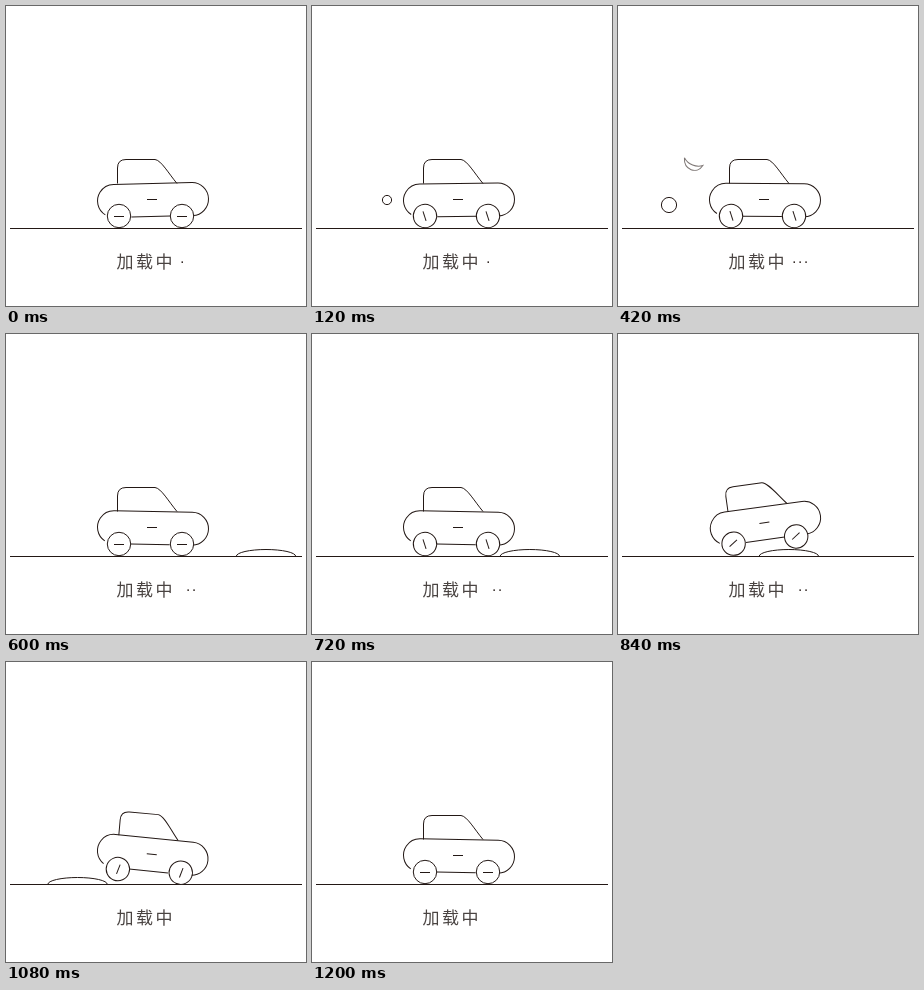
Recreate the animation shown at these times as an HTML page with a canvas. Size 300 by 300 pixels, loop 1.23 s.

```html
<!DOCTYPE html>
<html lang="zh">
<head>
<meta charset="utf-8">
<style>
  html, body { margin: 0; width: 100%; height: 100%; overflow: hidden; background: #fff; }
  canvas { display: block; width: 300px; height: 300px; }
</style>
</head>
<body>
<canvas id="stage"></canvas>
<script>
const LOOP = 1230, STEP = 30, INK = '#231815';
const canvas = document.getElementById('stage');
const ctx = canvas.getContext('2d');
const ratio = window.devicePixelRatio || 1;
canvas.width = canvas.height = 300 * ratio;

const radians = degrees => degrees * Math.PI / 180;
const within = (t, from, to) => t >= from && t < to;
const progress = (t, from, to) => Math.min(1, Math.max(0, (t - from) / (to - from)));

function stroke(build) {
  ctx.beginPath();
  build();
  ctx.stroke();
}

function line(x1, y1, x2, y2) {
  stroke(() => { ctx.moveTo(x1, y1); ctx.lineTo(x2, y2); });
}

function circle(x, y, r) {
  stroke(() => ctx.arc(x, y, r, 0, 2 * Math.PI));
}

function rotated(x, y, degrees, draw) {
  ctx.save();
  ctx.translate(x, y);
  ctx.rotate(radians(degrees));
  draw();
  ctx.restore();
}

function drawWheel(x, y, degrees) {
  rotated(x, y, degrees, () => {
    ctx.fillStyle = '#fff';
    ctx.beginPath();
    ctx.arc(0, 0, 11.7, 0, 2 * Math.PI);
    ctx.fill();
    ctx.stroke();
    line(-5, 0.5, 5, 0.5);
  });
}

function drawRoof() {
  stroke(() => {
    ctx.moveTo(-35.5, -16.5);
    ctx.lineTo(-35.5, -32);
    ctx.quadraticCurveTo(-35.5, -40.5, -27, -40.5);
    ctx.lineTo(2, -40.5);
    ctx.bezierCurveTo(8, -40, 16, -26, 24, -16.5);
  });
  line(-6, -0.5, 4, -0.5);
}

// The outline is open where the wheels sit.
function drawBody() {
  stroke(() => {
    ctx.arc(-39, 0, 16.5, radians(123), radians(270));
    ctx.arc(39, 0, 16.5, radians(-90), radians(88));
  });
  line(-22, 16.5, 17, 16.5);
}

// Crossing the bump lifts the car while it pitches up, then down.
function drawCar(t) {
  const crossing = progress(t, 720, 1110);
  const hump = Math.sin(Math.PI * crossing);
  const pitch = -Math.sin(2 * Math.PI * crossing);
  const bob = (2.4 * progress(t, 0, 600) - 1.3) * (1 - hump);

  rotated(144.5, 189 - 4.6 * hump, 7 * pitch, () => {
    rotated(2.5, 5 - hump, 3 * pitch + 1.6 * hump, () => {
      drawRoof();
      rotated(0, 0, bob, drawBody);
    });
    for (const side of [-1, 1]) drawWheel(31.5 * side, 21, t * 0.6);
  });
}

function drawLeaf(k) {
  ctx.globalAlpha = Math.min(1, 2.3 - 1.9 * k);
  rotated(230 - 171.5 * k, 114.2 + 46 * k, 68 * k - 38.5, () => stroke(() => {
    ctx.moveTo(-10, 0);
    ctx.bezierCurveTo(-6, 11.5, 8, 11, 10, 0);
    ctx.bezierCurveTo(5, 4.5, -4, 5, -10, 0);
  }));
  ctx.globalAlpha = 1;
}

function drawBump(k) {
  const x = 260 - 214 * Math.pow(k, 1.08);
  stroke(() => ctx.ellipse(x, 222.3, 29.7, 6.8, 0, Math.PI, 2 * Math.PI));
}

function drawLabel(t) {
  ctx.fillStyle = '#4a4442';
  ctx.font = '300 17px "Noto Sans CJK SC", "Noto Sans CJK", sans-serif';
  ctx.letterSpacing = '2.5px';
  ctx.fillText('加载中', 110.4, 262);
  ctx.fillStyle = INK;
  [600, 900, 1080].forEach((end, i) => {
    if (within(t, 200 * i, end)) ctx.fillRect(175.5 + 5.9 * i, 255.4, 1.5, 1.5);
  });
}

function draw(t) {
  ctx.setTransform(ratio, 0, 0, ratio, 0, 0);
  ctx.fillStyle = '#fff';
  ctx.fillRect(0, 0, 300, 300);
  ctx.strokeStyle = INK;
  ctx.lineWidth = 1;

  line(4, 222.5, 296, 222.5);
  if (within(t, 600, 1170)) drawBump(progress(t, 600, 1140));
  if (within(t, 120, 330)) circle(75, 194, 4.6);
  if (within(t, 210, 570)) circle(51, 199, 7.6);
  if (within(t, 150, 480)) drawLeaf(progress(t, 150, 450));
  drawCar(t);
  drawLabel(t);
}

const start = performance.now();
function tick() {
  const t = (performance.now() - start) % LOOP;
  draw(Math.floor(t / STEP) * STEP);
  requestAnimationFrame(tick);
}
tick();
</script>
</body>
</html>
```
